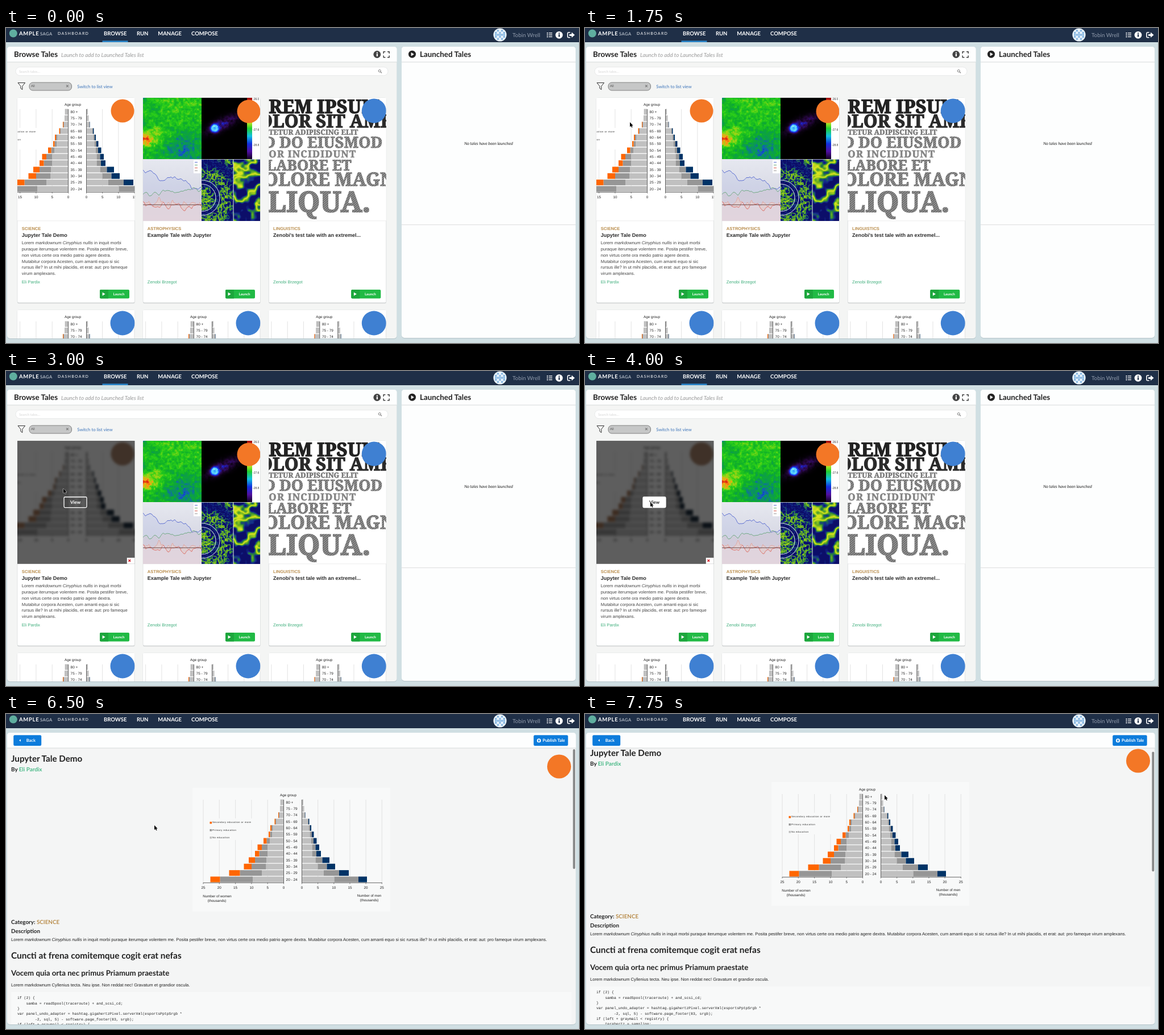
An HTML page with a canvas for the animation above (8 s loop, 1008 by 555 pixels).

```html
<!DOCTYPE html>
<html lang="en">
<head>
<meta charset="utf-8">
<title>Tale dashboard</title>
<style>
html, body { margin: 0; width: 100%; height: 100%; overflow: hidden; background: #d0dfe3; }
svg, canvas { position: absolute; display: block; }
svg { left: 0; top: 0; }
#sky { left: 241px; top: 123px; }
text { font-family: Lato, sans-serif; text-rendering: geometricPrecision; white-space: pre; }
.b { font-weight: 700; }
.i { font-style: italic; }
.m { text-anchor: middle; }
.a { font-family: "Liberation Sans", Arial, sans-serif; }
.c { font-family: "Liberation Mono", "Courier New", monospace; }
.s { font-family: "Noto Serif", serif; font-weight: 900; }
</style>
</head>
<body>
<svg id="stage" width="1008" height="555" viewBox="0 0 1008 555"></svg>
<canvas id="sky" width="206" height="217"></canvas>
<script>
const INK = '#222', GREEN = '#3fae7c', TAN = '#b98d4c', ORANGE = '#f37726', BLUE = '#3f80d2';
const AUTHORS = ['Eli Pardix', 'Zenobi Brzegot'];

// ---- drawing helpers; text is placed by its left edge and visual centre ----
const rect = (x, y, w, h, fill, more = '') =>
  `<rect x="${x}" y="${y}" width="${w}" height="${h}" fill="${fill}" ${more}/>`;
const circ = (x, y, r, fill, more = '') => `<circle cx="${x}" cy="${y}" r="${r}" fill="${fill}" ${more}/>`;
const path = (d, fill, more = '') => `<path d="${d}" fill="${fill}" ${more}/>`;
const line = (d, color, w = 1, more = '') => path(d, 'none', `stroke="${color}" stroke-width="${w}" ${more}`);
const text = (x, y, size, str, cls = '', fill = INK, more = '') =>
  `<text x="${x}" y="${(y + size * .35).toFixed(2)}" font-size="${size}" class="${cls}" fill="${fill}" ${more}>${str}</text>`;
const group = (inner, more = '') => `<g ${more}>${inner}</g>`;

// ---- population chart ----
const WOMEN = [[5, .7, 0], [6, .5, 0], [7.5, 1, 1], [13, 1.5, 1.5], [19, 2.5, 2], [20.5, 3.5, 2.5], [24.5, 5.5, 5.5],
  [28.5, 10, 7.5], [28.5, 14.5, 7.5], [30.5, 20, 11], [31, 25.5, 13.5], [38.5, 38.5, 19], [54.5, 57.5, 17]];
const MEN = [[2, .5, 0], [3.3, .5, 0], [4.5, 1, .5], [10.5, 1, 1.5], [12.5, 2, 2], [14, 3.5, 3.5], [16.5, 4, 5.5],
  [18, 6, 6.5], [18, 7.5, 8], [24, 12, 12.5], [28, 16, 14.5], [38.5, 27, 17], [57, 42.5, 15]];

function bars(parts, x, dir, y, last) {
  return parts.map((w, i) => {
    const left = dir > 0 ? x : x - w;
    x += dir * w;
    return rect(left, y - 5, w, 10, ['#c0c0c0', '#969696', last][i]);
  }).join('');
}

function chart() {
  let s = '';
  for (let k = 0; k <= 5; k++) {
    const l = 488.5 - k * 28.3, r = 520.5 + k * 28.15;
    const gap = k > 1 && k < 5;
    s += line(gap ? `M${l} 151V184M${l} 222V297` : `M${l} 151V297`, '#dcdcdc', .8);
    s += line(`M${r} 151V297`, '#dcdcdc', .8);
    s += line(`M${l} 297v2.5M${r} 297v2.5`, '#444', .7);
    s += text(l, 306, 6.3, k * 5, 'a m') + text(r, 306, 6.3, k * 5, 'a m');
  }
  for (let i = 0; i < 13; i++) {
    const y = 155.6 + i * 11.32, age = 80 - i * 5;
    s += bars(WOMEN[i], 488.5, -1, y, '#ff6600') + bars(MEN[i], 520.5, 1, y, '#003366');
    s += text(492.6, y, 6.4, i ? `${age} - ${age + 4}` : '80 +', 'a');
  }
  s += line('M488.5 151V297.4H347M520.5 151V297.4H661.5', '#444', .8);
  s += text(496.5, 142.5, 6.3, 'Age group', 'a m');
  [['Secondary education or more', '#ff6600'], ['Primary education', '#969696'], ['No education', '#c0c0c0']]
    .forEach(([label, color], i) => {
      const y = 191 + i * 13.1;
      s += rect(358.5, y - 1.2, 3.6, 3.6, color) + text(363, y, 4.2, label, 'a', INK, 'letter-spacing=".5"');
    });
  s += text(371.5, 320.5, 6.2, 'Number of women', 'a m') + text(371, 329, 6.2, '(thousands)', 'a m');
  return s + text(639, 319.5, 6.2, 'Number of men', 'a m') + text(639, 328, 6.2, '(thousands)', 'a m');
}

// ---- lettering picture ----
function lettering() {
  const rows = [
    [0, 15, 33, 'REM IPSUM', '#222'], [-18, 41, 31.5, 'OLOR SIT AMET', '#2a2a2a'],
    [0, 61, 12.6, 'TETUR ADIPISCING ELIT', '#777'], [-9, 79, 27, 'D DO EIUSMOD', 'url(#hatch)'],
    [0, 99.5, 17, 'OR INCIDIDUNT', '#858585', 1.2], [-4, 118.5, 25.8, 'LABORE ET', 'url(#hatch)'],
    [-9, 144, 32.5, 'OLORE MAGNA', 'url(#hatch)'], [-2, 183, 50, 'LIQUA.', 'url(#hatch)']];
  return rows.map(([x, y, size, str, fill, gap = 0]) =>
    text(x, y, size, str, 's', fill, `letter-spacing="${gap}" stroke="${fill}" stroke-width="${size * .04}"`)).join('');
}

// ---- cards ----
const useChart = '<use href="#chart" transform="translate(-399 -131)"/>';
const badge = color => circ(185, 23, color === BLUE ? 21.5 : 20.5, color);
const picture = (inner, id = '') =>
  group(group(rect(-9, -9, 226, 236, '#fff') + inner, id), 'clip-path="url(#photo)"');

const LOREM = ['Lorem <tspan class="i">markdownum Cinyphius nullis</tspan> in inquit morbi',
  'puraque iterumque volentem me. Posita pestifer breve,', 'non virtus certe ora medio patrio agere dextra.',
  'Mutabitur corpora Acesten, cum amanti equo si sic', 'rursus ille? In ut mihi placidis, et erat: aut: pro fameque',
  'virum amplexans.'];

function card(x, y, pic, kind, title, author, lines = []) {
  let s = rect(0, .8, 206.5, 361.5, '#c9cccd', 'rx="2.5"') + rect(0, 0, 206.5, 361, '#fff', 'rx="2.5" stroke="#d9dbdc" stroke-width=".7"');
  s += pic + line('M0 216.8H206.5', '#e6e6e6', .7);
  if (kind) {
    s += text(7.8, 230, 7.55, kind, 'a b', TAN) + text(7.8, 241.5, 9.03, title, 'a b', '#2b2b2b');
    s += lines.map((l, i) => text(7.8, 255.3 + i * 10.85, 7.66, l, 'a', '#444')).join('');
    s += text(7.8, 324.3, 7.6, author, 'a', GREEN);
    s += rect(145, 338, 52, 15.5, '#21ba45', 'rx="2"') + path('M147 338h13v15.5h-13q-2 0-2-2v-11.5q0-2 2-2z', '#1ca63c');
    s += path('M149.6 342.7l5 3-5 3z', '#fff') + text(178.5, 345.9, 6.2, 'Launch', 'b m', '#fff');
  }
  return group(s, `transform="translate(${x} ${y})"`);
}

// ---- page pieces ----
function panel(x, w, body, bottom) {
  return rect(x, 34, w, bottom - 33, '#b4c4c9', 'rx="5"') + rect(x, 33, w, bottom - 33, body, 'rx="5"') +
    path(`M${x} 60V38q0-5 5-5H${x + w - 5}q5 0 5 5V60z`, '#fdfefe') + line(`M${x} 60H${x + w}`, '#d2d5d6', .9);
}
const info = (x, y, disc, mark) => circ(x, y, 6.4, disc) + rect(x - 1, y - 1.2, 2.2, 4.6, mark) + rect(x - 1, y - 3.9, 2.2, 1.8, mark);

function topBar() {
  let s = rect(0, 0, 1008, 25, '#1f2f47') + rect(0, 24.2, 1008, .8, '#172439');
  s += circ(12.8, 9.5, 7, '#5fae9f');
  s += text(23, 10, 9.5, 'AMPLE', 'b', '#fff', 'letter-spacing=".7"') + text(60, 10, 7.6, 'SAGA', '', '#dfe5ec', 'letter-spacing=".5"');
  s += text(91, 10, 7, 'DASHBOARD', '', '#fff', 'letter-spacing="1.3"');
  [['BROWSE', 172], ['RUN', 230], ['MANAGE', 267.3], ['COMPOSE', 326]].forEach(([n, x]) => s += text(x, 9.8, 9.5, n, 'b', '#fff'));
  s += circ(869, 12, 11.6, '#eaf3fb');
  for (let r = -2; r <= 2; r++) for (let c = -2; c <= 2; c++)
    if ((r + c) % 2 || !r) s += rect(869 + c * 3.6 - 1.6, 12 + r * 3.6 - 1.6, 3.2, 3.2, '#86b7e2');
  s += text(891, 12.8, 9.8, 'Tobin Wrell', '', '#8f9aab');
  for (let i = 0; i < 3; i++) s += rect(951.5, 8 + i * 3.3, 2, 1.8, '#fff') + rect(955, 8.2 + i * 3.3, 6, 1.3, '#fff');
  s += info(973, 12.3, '#fff', '#1f2f47');
  s += line('M992.5 7.8h-2.8q-1.7 0-1.7 1.7v5.6q0 1.7 1.7 1.7h2.8', '#fff', 1.6);
  return s + path('M991 10.7h4V7.6l5.6 4.7-5.6 4.7v-3.1h-4z', '#fff');
}

function browsePage() {
  let s = rect(169.5, 22.4, 45, 2.4, '#2b8ed6') + panel(2, 685.5, '#f4f5f4', 547) + panel(696, 306, '#fdfefe', 546);
  s += text(14, 46.5, 13.35, 'Browse Tales', 'b') + text(97, 47.8, 9.75, 'Launch to add to Launched Tales list', 'i', '#9a9a9a');
  s += info(652.8, 46.5, '#444', '#fff');
  s += line('M664.2 45v-3.2h3.2M671 41.8h3.2V45M674.2 48.6v3.2H671M667.4 51.8h-3.2v-3.2', '#444', 1.5);
  s += rect(17, 68.8, 655, 15, '#fff', 'rx="7.5" stroke="#e3e5e5" stroke-width=".8"');
  s += text(23, 76.5, 6.2, 'Search tales...', '', '#d6d6d6');
  s += circ(657.3, 75.6, 2, 'none', 'stroke="#777" stroke-width="1"') + line('M658.8 77.1l2.2 2.2', '#777', 1.2);
  s += line('M21 96.5h12.6l-4.8 6v6l-3-2.2v-3.8z', '#333', 1);
  s += rect(41, 96, 74.5, 14, '#c6c7c7', 'rx="6" stroke="#777" stroke-width=".9"');
  s += text(44, 102.2, 5.8, 'All', '', '#555') + line('M106 100.4l3.8 3.8m0-3.8l-3.8 3.8', '#777', 1.1);
  s += text(125.3, 103, 7.85, 'Switch to list view', '', '#3b73b9');
  const xs = [20, 241, 462.3];
  let cards = card(xs[0], 123, picture(useChart + badge(ORANGE), 'id="thumb"'), 'SCIENCE', 'Jupyter Tale Demo', AUTHORS[0], LOREM);
  cards += card(xs[1], 123, '', 'ASTROPHYSICS', 'Example Tale with Jupyter', AUTHORS[1]);
  cards += card(xs[2], 123, picture(lettering() + badge(BLUE)), 'LINGUISTICS', 'Zenobi\'s test tale with an extremel...', AUTHORS[1]);
  xs.forEach(x => cards += card(x, 497, picture(useChart + badge(BLUE))));
  s += group(cards, 'clip-path="url(#left)"');
  s += group(rect(20, 123, 206.5, 216.8, '#000', 'opacity=".63"') +
    rect(102, 222, 40, 18.6, 'none', 'id="viewBox" rx="1.8" stroke="#fff" stroke-width="1.3"') +
    text(122, 231.5, 8, 'View', 'b m', '#fff', 'id="viewText"') +
    rect(212.8, 329, 13.7, 10.8, '#fff') + line('M215.4 332.3l3.8 3.8m0-3.8l-3.8 3.8', '#d3232b', 1.4), 'id="dim"');
  s += circ(714.5, 46.2, 6.5, INK) + path('M712.7 42.9l5.2 3.3-5.2 3.3z', '#fff') + text(728, 46.5, 13.4, 'Launched Tales', 'b');
  s += text(849, 203.8, 7.2, 'No tales have been launched', 'i m');
  return s + line('M696 346.7H1002', '#d8dadb', .9);
}

const CODE = ['if (2) {', '    samba = readSpool(traceroute) + and_scsi_cd;', '}',
  'var panel_undo_adapter = hashtag.gigahertzPixel.serverXml(esportsPptpSrgb *',
  '        -2, sql, 5) - software.page_footer(83, srgb);', 'if (left + graymail &lt; registry) {', '    terahertz = sampling;'];

function talePage() {
  let d = text(9, 78.5, 15.2, 'Jupyter Tale Demo', 'b');
  d += text(9, 97.3, 9.85, `By <tspan fill="#4cba89">${AUTHORS[0]}</tspan>`, 'b') + circ(973, 92.5, 21, ORANGE);
  d += rect(328, 130, 348, 218, '#f8f9f9') + '<use href="#chart"/>';
  d += text(9, 366.7, 9.85, `Category: <tspan fill="${TAN}">SCIENCE</tspan>`, 'b') + text(9, 382.5, 9.85, 'Description', 'b');
  d += text(9, 397, 7.64, LOREM.join(' '), 'a');
  d += text(9, 425.3, 15.4, 'Cuncti at frena comitemque cogit erat nefas', 'b');
  d += text(9, 456.3, 13.25, 'Vocem quia orta nec primus Priamum praestate', 'b');
  d += text(9, 477.6, 7.64, 'Lorem markdownum Cyllenius tecta. Neu ipse. Non reddat nec! Gravatum et grandior oscula.', 'a');
  d += rect(9, 490, 986, 90, '#f8f9f9');
  d += CODE.map((l, i) => text(20, 500 + i * 9.32, 6.44, l, 'c')).join('');
  let s = panel(2, 1000.5, '#f4f5f5', 547) + group(group(d, 'id="doc"'), 'clip-path="url(#wide)"');
  s += rect(997.4, 62, 3.8, 211, '#858686', 'id="thumbBar" rx="1.9"');
  s += rect(13.2, 37.3, 49, 18.6, '#0d7cdc', 'rx="2.2"') + path('M25.8 44.3v4.4l-2.6-2.2z', '#fff') + text(35.8, 46.8, 7.4, 'Back', 'b', '#fff');
  s += rect(928.2, 37.3, 60.5, 18.6, '#0d7cdc', 'rx="2.2"') + circ(937.5, 46.8, 3.5, '#fff');
  s += path('M937.5 44.4l2.2 2.4h-1.4v2.2h-1.6v-2.2h-1.4z', '#0d7cdc');
  return s + text(944, 46.8, 7.5, 'Publish Tale', 'b', '#fff');
}

const clip = (id, box) => `<clipPath id="${id}">${box}</clipPath>`;
const $ = id => document.getElementById(id);
$('stage').innerHTML = '<defs>' + group(chart(), 'id="chart"') +
  clip('photo', rect(0, 0, 206.5, 216.8, '#000', 'rx="1.5"')) +
  clip('left', path('M2 61H687.5V542q0 5-5 5H7q-5 0-5-5z', '#000')) +
  clip('wide', path('M2 60.5H1002.5V542q0 5-5 5H7q-5 0-5-5z', '#000')) +
  '<pattern id="hatch" width="3" height="3" patternUnits="userSpaceOnUse" patternTransform="rotate(-40)">' +
  rect(0, 0, 3, 3, '#6c6c6c') + rect(0, 0, 3, 1, '#a2a2a2') + '</pattern></defs>' +
  topBar() + group(browsePage(), 'id="browse"') + group(talePage(), 'id="tale"') +
  path('M0 0v8.2l1.9-1.7 1.3 2.8 1.4-.6-1.3-2.7h2.4z', '#000',
    'id="cursor" stroke="#fff" stroke-width=".9" paint-order="stroke"');

// ---- astronomy collage ----
const ctx = $('sky').getContext('2d');
const clamp = v => Math.max(0, Math.min(1, v));
const hash = (x, y) => { const v = Math.sin(x * 127.1 + y * 311.7) * 43758.5453; return v - Math.floor(v); };
function noise(x, y) {
  const i = Math.floor(x), j = Math.floor(y), soft = f => f * f * (3 - 2 * f);
  const u = soft(x - i), v = soft(y - j), mix = (a, b, f) => a + (b - a) * f;
  return mix(mix(hash(i, j), hash(i + 1, j), u), mix(hash(i, j + 1), hash(i + 1, j + 1), u), v);
}
const fbm = (x, y) => (noise(x, y) + noise(x * 2, y * 2) * .5 + noise(x * 4, y * 4) * .25) / 1.75;
const bump = (x, y, r) => Math.exp(-(x * x + y * y) / (r * r));
const band = (r, mid, width) => bump(r - mid, 0, width);
function ramp(stops, v) {
  const p = clamp(v) * (stops.length - 1), i = Math.min(Math.floor(p), stops.length - 2);
  return stops[i].map((a, k) => a + (stops[i + 1][k] - a) * (p - i));
}
function field(x0, y0, w, h, stops, f) {
  const img = ctx.createImageData(w, h);
  for (let y = 0; y < h; y++) for (let x = 0; x < w; x++)
    img.data.set([...ramp(stops, f(x + x0, y + y0)), 255], (y * w + x) * 4);
  ctx.putImageData(img, x0, y0);
}
function disc(r, x, y) { ctx.beginPath(); ctx.arc(x, y, r, 0, 7); }

function sky() {
  const heat = [[15, 20, 130], [20, 80, 210], [10, 150, 90], [15, 175, 40], [40, 205, 25], [150, 215, 20], [250, 160, 20], [220, 30, 15]];
  field(0, 0, 103, 108, heat, (x, y) => .5 + (fbm(x / 4, y / 4) - .5) * .4 + (fbm(x / 22, y / 22) - .5) * .25 -
    bump((x - 70) / 1.4, y - 88, 27) * .24 + bump(x - 3, y - 74, 13) * .4 + bump(x - 24, y - 66, 16) * .2);
  const glow = [[0, 0, 0], [45, 8, 75], [30, 30, 190], [30, 70, 255], [60, 190, 255], [150, 235, 245]];
  field(103, 0, 103, 108, glow, (x, y) => {
    const dx = x - 126, dy = y - 53, along = dx * .876 - dy * .48, across = dx * .48 + dy * .876;
    return bump(dx, dy, 7) * .5 + band(Math.hypot(dx, dy), 5, 3) * .4 +
      bump((along - 16) / 3, across, 9) * .55 * fbm(x / 4, y / 4);
  });
  const cell = [[12, 14, 105], [20, 45, 140], [40, 130, 60], [130, 190, 30], [225, 230, 30]];
  const ridge = (x, y, k) => 1 - Math.abs(fbm(x, y) - .5) * k;
  field(103, 108, 56, 109, cell, (x, y) => {
    const r = Math.hypot(x - 104, y - 176);
    return ridge(x / 5, y / 5, 4.5) * .85 - band(r, 27, 5) * .5 - band(r, 64, 9) * .6;
  });
  field(159, 108, 47, 109, cell, (x, y) => ridge(x / 24, y / 24 + 9, 7));

  const bar = ctx.createLinearGradient(0, 0, 0, 108);
  ['#a01010', '#f02010', '#ffa010', '#f0f020', '#20d030', '#10c0e0', '#1030e0', '#5010a0', '#100020']
    .forEach((c, i, all) => bar.addColorStop(i / (all.length - 1), c));
  ctx.fillStyle = bar; ctx.fillRect(183, 0, 9, 108);
  ctx.fillStyle = '#fff'; ctx.fillRect(192, 0, 14, 108);
  ctx.fillStyle = '#333'; ctx.font = '5px "Liberation Sans", sans-serif';
  ['-26.0', '-26.5', '-27.6', '-28.8'].forEach((s, i) => ctx.fillText(s, 193, 4 + i * 27));

  // time series: each curve drifts by `tilt` from left to right
  const haze = ctx.createLinearGradient(0, 108, 0, 217);
  haze.addColorStop(0, '#e6e8f0'); haze.addColorStop(.5, '#d9dae5'); haze.addColorStop(1, '#e6dcdc');
  ctx.fillStyle = haze; ctx.fillRect(0, 108, 103, 109);
  const curve = (color, base, tilt, amp, seed, step, fill) => {
    ctx.beginPath();
    for (let x = 0; x <= 103; x++) ctx.lineTo(x, base + tilt * x / 103 + amp * (fbm(x / step, seed) - .5));
    ctx.strokeStyle = color; ctx.lineWidth = .8; ctx.stroke();
    ctx.lineTo(103, 217); ctx.lineTo(0, 217);
    ctx.fillStyle = fill; ctx.fill();
  };
  curve('#3048c8', 128, 34, 48, 3.3, 15, 'rgba(170,185,225,.25)');
  curve('#4a9c60', 172, -8, 34, 8.7, 14, 'rgba(210,190,200,.3)');
  curve('#e0948a', 184, 0, 34, 15.1, 8, 'rgba(245,205,190,.35)');
  curve('#d83a28', 188, 6, 26, 21.4, 9, 'rgba(225,220,235,.5)');
  ctx.fillStyle = '#5a3838'; ctx.fillRect(0, 188, 103, .8);
  ctx.fillStyle = '#fff'; ctx.fillRect(89, 110, 14, 23);
  ['#3048c8', '#4a9c60', '#d83a28', '#888'].forEach((c, i) => { ctx.fillStyle = c; ctx.fillRect(91, 113 + i * 5, 5, .8); });

  ctx.save();
  ctx.beginPath(); ctx.rect(103, 108, 56, 109); ctx.clip();
  ctx.strokeStyle = 'rgba(255,255,255,.85)'; ctx.lineWidth = 1;
  [24, 31].forEach(r => { disc(r, 104, 176); ctx.stroke(); });
  ctx.restore();
  ctx.fillStyle = '#e8ece8';
  ctx.fillRect(158.5, 108, 1, 109); ctx.fillRect(0, 108, 206, .7);
  ctx.fillStyle = ORANGE; disc(20.5, 186, 24); ctx.fill();
}
sky();

// ---- motion: [time, values...] ----
const LOOP = 8000, TICK = 250;
const POINTER = [[500, 10, 64], [1000, 40, 112], [1500, 64, 149], [1750, 79, 166], [2250, 96, 193], [2750, 105, 208],
  [3000, 101, 207], [4000, 115, 231], [5500, 115, 231], [5750, 130, 227], [6500, 261, 196], [7500, 520, 145], [7750, 527, 143]];
const SCROLL = [[7500, 0], [7750, 10]];

function at(keys, t) {
  const n = keys.findIndex(k => k[0] > t);
  if (n === 0) return keys[0].slice(1);
  if (n < 0) return keys[keys.length - 1].slice(1);
  const a = keys[n - 1], b = keys[n], f = (t - a[0]) / (b[0] - a[0]);
  return a.slice(1).map((v, i) => v + (b[i + 1] - v) * f);
}
const show = (id, on) => $(id).style.display = on ? '' : 'none';

function frame(now) {
  const t = Math.floor(now % LOOP / TICK) * TICK;
  const open = t >= 5000, hover = t >= 3000 && !open, pressed = t >= 3750;
  show('browse', !open); show('sky', !open); show('tale', open);
  show('dim', hover); show('cursor', t >= 500);
  $('thumb').style.filter = hover ? 'blur(2.3px) grayscale(.7)' : 'none';
  $('viewBox').setAttribute('fill', pressed ? '#fff' : 'none');
  $('viewText').setAttribute('fill', pressed ? INK : '#fff');
  const [x, y] = at(POINTER, t), [dy] = at(SCROLL, t);
  $('cursor').setAttribute('transform', `translate(${Math.round(x)} ${Math.round(y)})`);
  $('doc').setAttribute('transform', `translate(0 ${-dy})`);
  $('thumbBar').setAttribute('y', 62 + dy * .44);
  requestAnimationFrame(frame);
}
requestAnimationFrame(frame);
</script>
</body>
</html>
```
